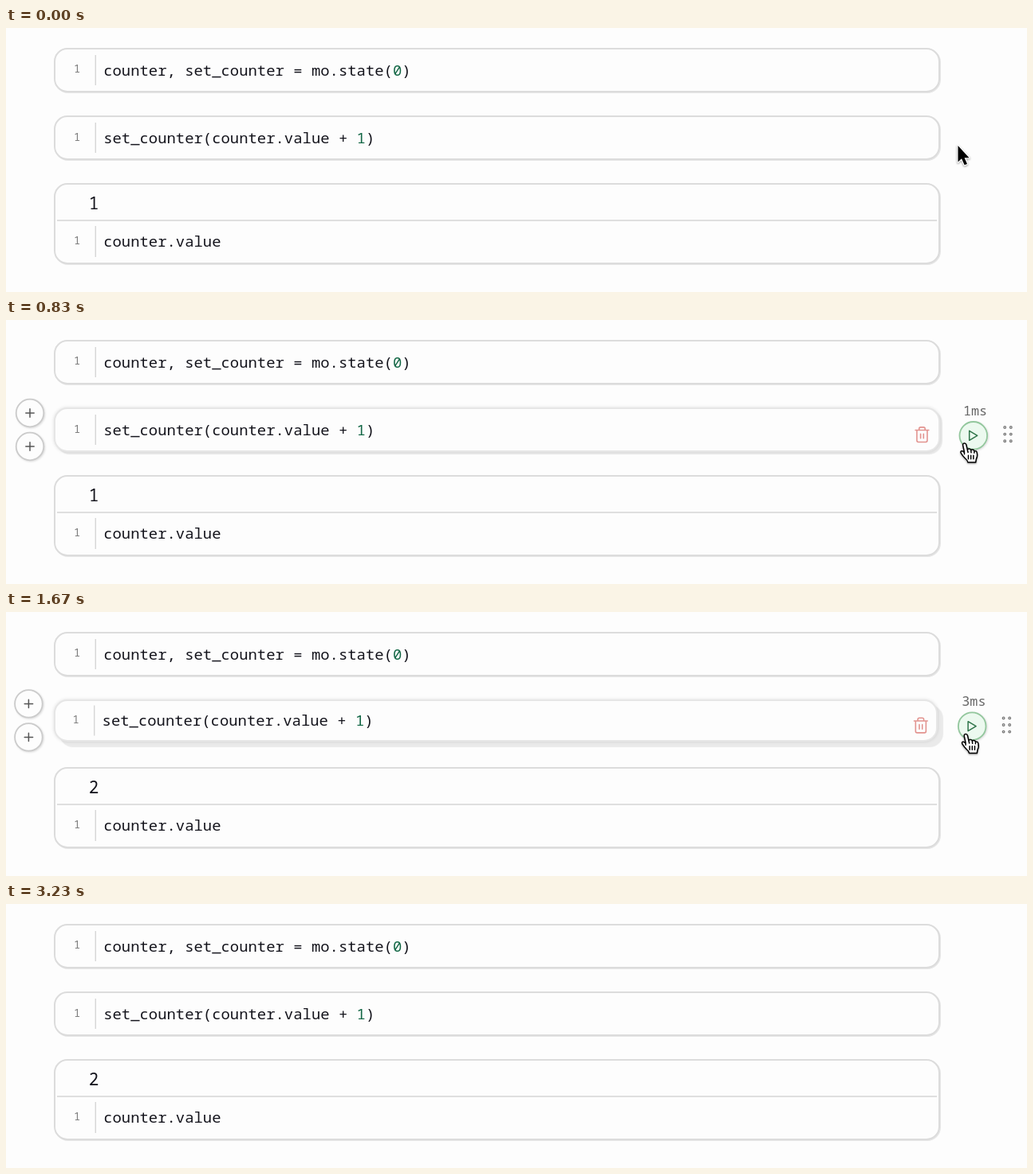
Write an HTML page that moves like this. It is 1280x332 px and loops after 3.26 s.

```html
<!DOCTYPE html>
<html lang="en">
<head>
<meta charset="utf-8">
<title>Counter cells</title>
<style>
html, body { margin: 0; width: 100%; height: 100%; overflow: hidden; background: #fdfdfd; }
.cell {
  position: absolute; left: 60px; width: 1111px; box-sizing: border-box;
  border: 2px solid #dcdcdc; border-radius: 17px; background: #fdfdfd;
  box-shadow: 1px 1px 0 #e6e6e6;
}
svg { position: absolute; left: 0; top: 0; }
text { font: 18.9px "Fira Mono", "Noto Sans Mono", "DejaVu Sans Mono", monospace; fill: #14141c; white-space: pre; }
.no { font-size: 13.6px; fill: #7d7d7d; }
.out { font-size: 21px; }
.ms { font-size: 16.8px; fill: #666; text-anchor: middle; }
.num { fill: #116644; }
.rule { stroke: #d6d6d6; stroke-width: 1.4; }
.icon { fill: none; stroke: #555; stroke-width: 1.5; stroke-linecap: round; stroke-linejoin: round; }
.disc { fill: #fdfdfd; stroke: #cbcbcb; stroke-width: 1.8; filter: drop-shadow(1.5px 1.5px 1px #0002); }
#run.on .disc { fill: #ecf9ef; stroke: #93c79d; }
#run.on .icon { stroke: #2f7449; }
.shade { filter: drop-shadow(0.5px 1.5px 1px #0006); }
</style>
</head>
<body>
<div class="cell" style="top:25px;height:56px"></div>
<div class="cell" id="box" style="top:110px;height:56px"></div>
<div class="cell" style="top:195px;height:102px"></div>
<svg width="1280" height="332" viewBox="0 0 1280 332">
  <path class="rule" d="M112.3 34V72M112.3 249V288M64 242H1167"/>
  <text class="no" x="85" y="56">1</text>
  <text x="122.2" y="59.5">counter, set_counter = mo.state(<tspan class="num">0</tspan>)</text>
  <text class="out" id="value" x="103.7" y="228.3">1</text>
  <text class="no" x="85" y="272">1</text>
  <text x="122.2" y="275">counter.value</text>
  <g id="active">
    <path class="rule" d="M112.3 119V157"/>
    <text class="no" x="85" y="141.5">1</text>
    <text x="122.2" y="144.7">set_counter(counter.value + <tspan class="num">1</tspan>)</text>
    <g id="tools">
      <g id="add">
        <circle class="disc" cx="30" cy="117" r="17.3"/>
        <path class="icon" d="M24.8 117H35.2M30 111.8V122.2"/>
      </g>
      <use href="#add" y="42"/>
      <path class="icon" style="stroke:#e2938f;stroke-width:1.7" transform="translate(1137.3 133) scale(.93)"
        d="M3 6H21M19 6V20Q19 22 17 22H7Q5 22 5 20V6M8 6V4Q8 2 10 2H14Q16 2 16 4V6M10 11V17M14 11V17"/>
      <text class="ms" id="time" x="1215" y="120">1ms</text>
      <g id="run">
        <circle class="disc" cx="1212.8" cy="145.3" r="17.3"/>
        <path class="icon" d="M1207.7 139.3L1217.7 145.3L1207.7 151.3Z"/>
      </g>
      <g id="grip" class="icon" style="stroke:#777;stroke-width:1.3"></g>
    </g>
  </g>
  <g class="shade">
    <path id="arrow" fill="#000" stroke="#fff" stroke-width="2.4" paint-order="stroke" stroke-linejoin="round"
      d="M.5 0V20.5L5 16.3L8.6 24.3L12 22.9L8.6 15.2H14.5Z"/>
    <path id="hand" fill="#fff" stroke="#000" stroke-width="1.5" stroke-linecap="round" stroke-linejoin="round"
      d="M-1.6 11L-3.4 2.6Q-3.8 .3 -1.8 0Q.2 -.3 .8 2L2.2 8.2Q2.8 6.8 4.6 7Q6.3 7.2 6.6 8.7Q7.4 7.6 9 8Q10.5 8.4 10.8 9.8Q13.6 9 14.2 12Q15.2 16.5 13.4 19.5L12.6 24H2.8Q2.6 21.5 -.6 19Q-3.5 16 -5.5 12.8Q-7 10.6 -5.2 9.8Q-3.6 9.2 -1.6 11.8V13.8M2.2 8.2L3 11.5M6.6 8.7L7 11.8M10.8 9.8V12.3M3.4 15.2V19.8M6.6 15.2V19.8M9.8 15.2V19.8"/>
  </g>
</svg>
<script>
const LOOP = 3260;
const $ = id => document.getElementById(id);
const ramp = (t, a, b) => Math.min(1, Math.max(0, (t - a) / (b - a)));
const ease = k => k * k * (3 - 2 * k);
const move = (el, x, y) => el.setAttribute('transform', `translate(${x} ${y})`);
const show = (el, on) => el.style.display = on ? '' : 'none';

for (const y of [135, 143.6, 152.2])
  for (const x of [1252.2, 1259.8])
    $('grip').insertAdjacentHTML('beforeend', `<circle cx="${x}" cy="${y}" r="1.3"/>`);

function draw(t) {
  const away = ramp(t, 2275, 2365);
  const hover = ramp(t, 250, 370) * (1 - away);
  const lift = ease(ramp(t, 1430, 1610)) * (1 - away);

  // Hovered cell: soft shadow, then lifted off a flat one
  const box = $('box').style;
  const offset = 1 + 2 * hover + 4 * lift;
  const grey = 230 + 4 * hover;
  box.width = 1111 - 3 * lift + 'px';
  box.height = 56 - 3 * lift + 'px';
  box.borderColor = `rgba(0,0,0,${0.13 - 0.04 * hover})`;
  box.boxShadow = `0 0 ${4 * hover}px rgba(0,0,0,${0.12 * hover}),` +
    `${offset}px ${offset}px ${hover}px rgb(${grey},${grey},${grey})`;

  move($('active'), -1.6 * lift, -1.6 * lift);
  $('tools').style.opacity = hover;
  $('time').textContent = t < 1530 ? '1ms' : '3ms';
  $('value').textContent = t < 1630 ? '1' : '2';

  // Pointer: drift onto the button, click, leave through the top
  const exit = ramp(t, 2150, 2262) ** 2;
  const enter = ease(ramp(t, 230, 540));
  const x = 1193 + 8 * enter + 3.5 * ease(ramp(t, 580, 1060)) + 10 * exit;
  const y = 148 + 7 * enter - 1.5 * ease(ramp(t, 1300, 1600)) - 195 * exit;
  const over = t > 330 && y > 128;
  $('run').classList.toggle('on', over);
  show($('hand'), over);
  show($('arrow'), !over && t < 2262);
  move($('hand'), x + 0.2, y);
  move($('arrow'), x, y);
}

function tick(now) {
  draw(now % LOOP);
  requestAnimationFrame(tick);
}
draw(0);
requestAnimationFrame(tick);
</script>
</body>
</html>
```
